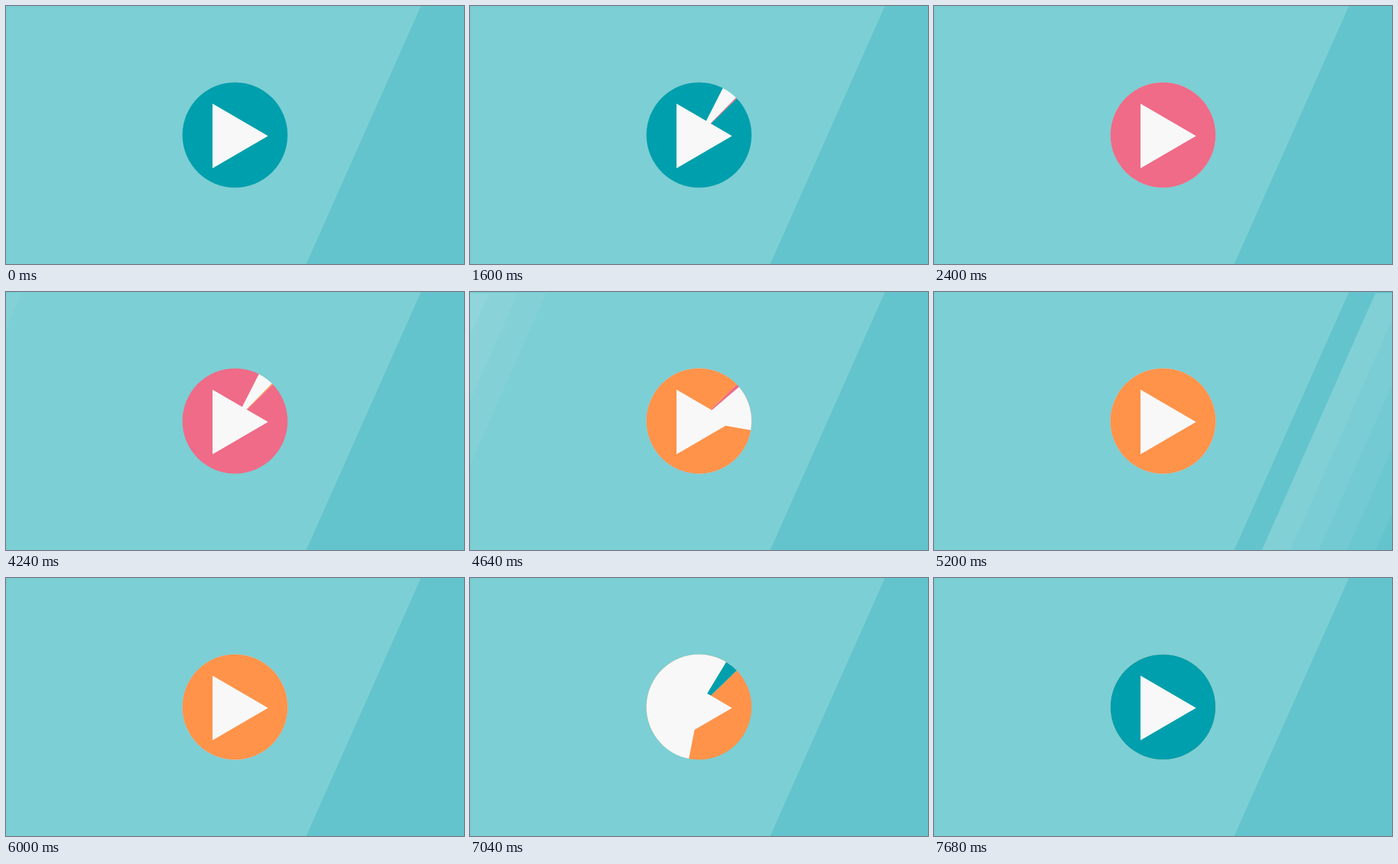
An HTML page with a canvas for the animation above (7.76 s loop, 723x407 px).

```html
<!DOCTYPE html>
<html lang="en">
<head>
<meta charset="utf-8">
<title>Play button</title>
<style>
  html, body { margin: 0; width: 100%; height: 100%; overflow: hidden; background: #63c4cd; }
  canvas { display: block; width: 723px; height: 407px; }
</style>
</head>
<body>
<canvas id="stage" width="723" height="407"></canvas>
<script>
const ctx = document.getElementById('stage').getContext('2d');
const W = 723, H = 407;
const LOOP = 7760, TICK = 80;
const CENTER = { x: 361.5, y: 203.5, r: 83 };
const DISCS = ['#009fad', '#ef6b87', '#ff934a'];
const WHITE = '#f8f8f8';

const WIPE = { first: 1280, every: 2640, reset: 320, length: 900, whiteDelay: 16, colorDelay: 192 };
const START_ANGLE = -44 * Math.PI / 180;

// Left edge of the light streak while it speeds up: [ms, x]
const STREAK_IN = [
  [3920, -182], [4240, -155], [4400, -137], [4560, -101],
  [4640, -60], [4720, 48], [4800, 198], [4880, 339]
];
const STREAK_END = 6000;

function easeInOutExpo(u) {
  if (u <= 0) return 0;
  if (u >= 1) return 1;
  return u < 0.5 ? 2 ** (20 * u - 10) / 2 : 1 - 2 ** (10 - 20 * u) / 2;
}

function polygon(points, fill) {
  ctx.beginPath();
  points.forEach(([x, y]) => ctx.lineTo(x, y));
  ctx.closePath();
  ctx.fillStyle = fill;
  ctx.fill();
}

function pie(share, fill) {
  if (share <= 0) return;
  const { x, y, r } = CENTER;
  ctx.beginPath();
  if (share >= 1) {
    ctx.arc(x, y, r, 0, 2 * Math.PI);
  } else {
    ctx.moveTo(x, y);
    ctx.arc(x, y, r, START_ANGLE, START_ANGLE - share * 2 * Math.PI, true);
  }
  ctx.fillStyle = fill;
  ctx.fill();
}

function drawBackground() {
  ctx.fillStyle = '#63c4cd';
  ctx.fillRect(0, 0, W, H);
  polygon([[0, 0], [655, 0], [474, H], [0, H]], '#7ccfd4');
  ctx.fillStyle = 'rgba(99, 196, 205, 0.3)';
  ctx.fillRect(0, 0, 655, 1);
  ctx.fillRect(0, 1, 1, H);
}

function streakX(t) {
  const next = STREAK_IN.findIndex(([time]) => time > t);
  if (next < 0) return 920 - 581 * 2 ** ((4880 - t) / 232);
  const [t0, x0] = STREAK_IN[next - 1], [t1, x1] = STREAK_IN[next];
  return x0 + (x1 - x0) * (t - t0) / (t1 - t0);
}

function drawStreak(t) {
  if (t < STREAK_IN[0][0] || t >= STREAK_END) return;
  const left = streakX(t), lean = 179;
  for (let layer = 1; layer <= 4; layer++) {
    const right = left + 45 * layer;
    polygon([[left, 2], [right, 2], [right - lean, H], [left - lean, H]],
      'rgba(255, 255, 255, 0.05)');
  }
}

function drawButton(t) {
  const turn = Math.max(0, Math.floor((t - WIPE.first + WIPE.reset) / WIPE.every));
  const local = t - WIPE.first - turn * WIPE.every;
  const swept = delay => easeInOutExpo((local - delay) / WIPE.length);
  pie(1, DISCS[turn]);
  pie(swept(WIPE.whiteDelay), WHITE);
  pie(swept(WIPE.colorDelay), DISCS[(turn + 1) % DISCS.length]);
  polygon([[326, 154], [413.7, 205], [326, 256]], WHITE);
}

function draw(elapsed) {
  const t = Math.floor((elapsed % LOOP) / TICK) * TICK;
  drawBackground();
  drawStreak(t);
  drawButton(t);
}

const begin = performance.now();
function loop() {
  draw(performance.now() - begin);
  requestAnimationFrame(loop);
}
loop();
</script>
</body>
</html>
```
